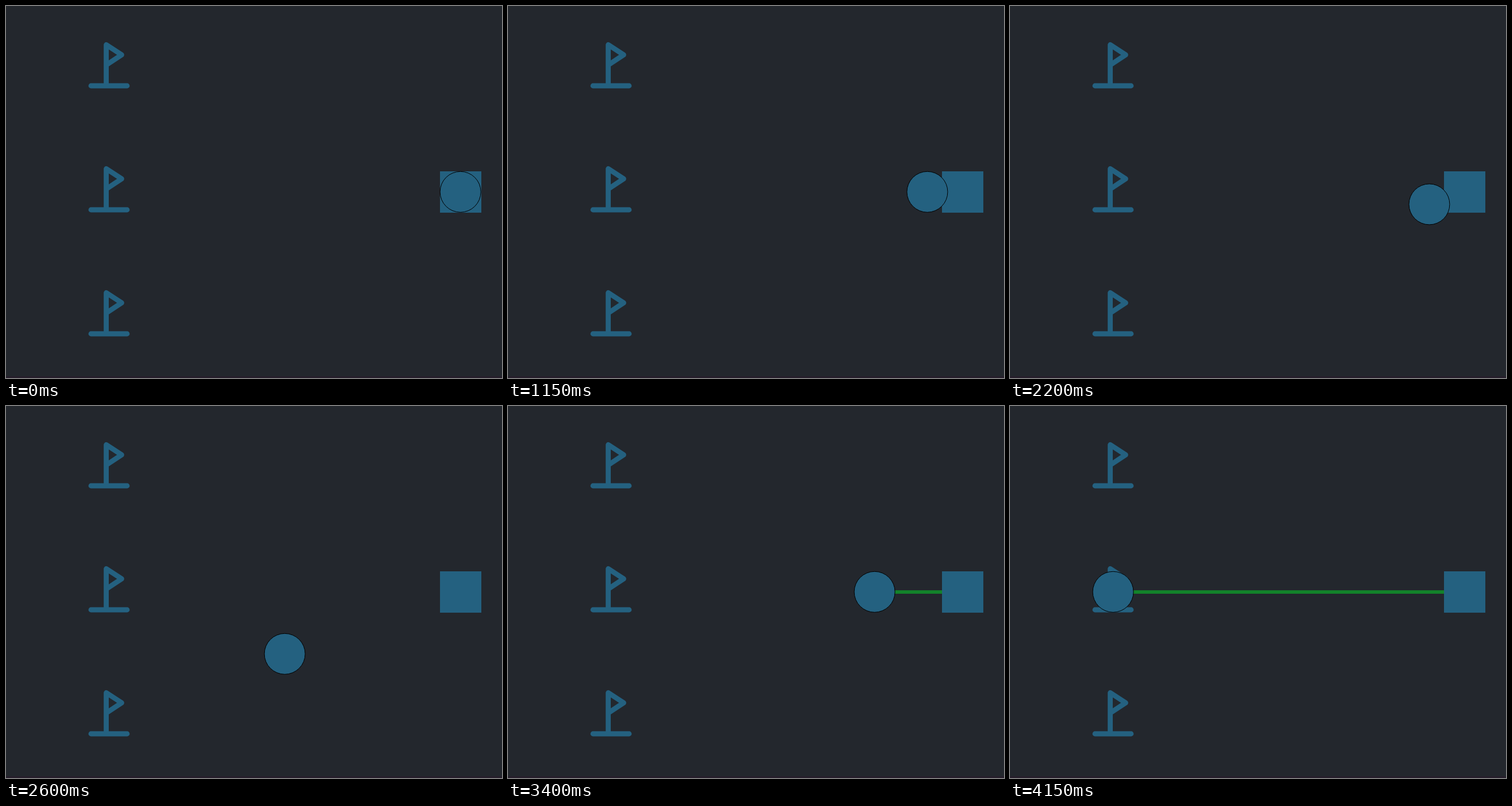
These frames come from a looping animation (864 by 648 pixels, 4200 ms). An HTML page:

```html
<!DOCTYPE html>
<html lang="en">
<head>
<meta charset="utf-8">
<title>Ball and flags</title>
<style>
  html, body { margin: 0; height: 100%; overflow: hidden; background: #23272d; }
  svg { display: block; }
</style>
</head>
<body>
<svg width="864" height="648" viewBox="0 0 864 648">
  <defs>
    <path id="flag" d="M148 139H211M174.6 139V67.5L201.5 85L174.6 102.8" fill="none"
      stroke="#246180" stroke-width="8.8" stroke-linecap="round" stroke-linejoin="round"/>
  </defs>
  <rect y="645" width="864" height="3" fill="#261f2b"/>
  <use href="#flag"/>
  <use href="#flag" y="216"/>
  <use href="#flag" y="432"/>
  <path id="trail" stroke="#13822a" stroke-width="6"/>
  <rect x="756" y="288" width="72" height="72" fill="#246180"/>
  <circle id="ball" r="35.5" fill="#246180" stroke="#000"/>
</svg>
<script>
  const STEP_MS = 50, STEPS = 20;
  const start = { x: 791.6, y: 323.8 };
  const flagX = 179.6;
  const rises = [-216, 0, 216, 0]; // vertical travel of each trip
  const ball = document.getElementById('ball');
  const trail = document.getElementById('trail');

  function draw(ms) {
    const tick = Math.floor(ms / STEP_MS) % (rises.length * (STEPS + 1));
    const trip = Math.floor(tick / (STEPS + 1));
    const progress = tick % (STEPS + 1) / STEPS;
    const x = start.x + (flagX - start.x) * progress;
    ball.setAttribute('cx', x);
    ball.setAttribute('cy', start.y + rises[trip] * progress);
    // Only the last trip leaves a line behind.
    trail.setAttribute('d', trip === 3 ? `M792 324H${x}` : '');
  }

  let began;
  function loop(now) {
    began ??= now;
    draw(now - began);
    requestAnimationFrame(loop);
  }
  draw(0);
  requestAnimationFrame(loop);
</script>
</body>
</html>
```
